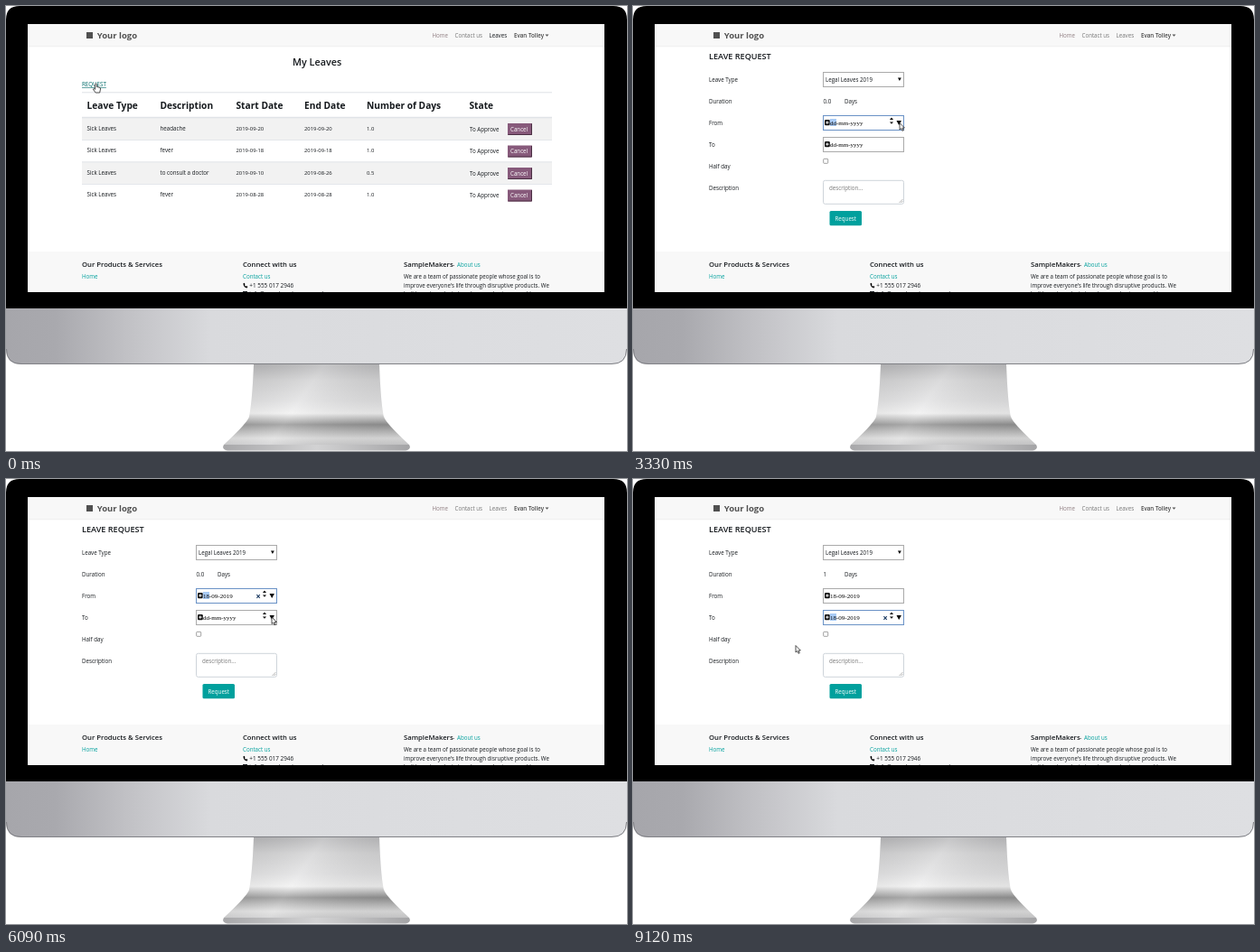
An HTML page that plays this animation: 687x493 px, repeating every 9150 ms.

```html
<!DOCTYPE html>
<html lang="en">
<head>
<meta charset="utf-8">
<title>Leave request</title>
<style>
  html, body { margin: 0; width: 100%; height: 100%; overflow: hidden; background: #fff; }
  svg { display: block; width: 687px; height: 493px; }
  text { font: 500 6.2px "Open Sans", "Noto Sans", sans-serif; fill: #15191d; white-space: pre; }
  text.th { font-size: 10.2px; font-weight: 700; }
  text.title { font-size: 10.8px; font-weight: 600; }
  text.caps { font-size: 9.1px; font-weight: 600; }
  text.logo { font-size: 9.5px; font-weight: 700; fill: #505050; }
  text.foot { font-size: 7.7px; font-weight: 600; }
  text.num { font-size: 5.9px; }
  text.phone { font-size: 6.4px; }
  text.user { font-weight: 600; fill: #444; }
  text.grey { fill: #777; }
  text.rose { fill: #8f7d80; }
  text.teal { fill: #00a09d; }
  text.link { fill: #006b69; text-decoration: underline; }
  text.white { fill: #fff; }
  text.date { font: 7px "Liberation Serif", "Times New Roman", serif; fill: #000; }
</style>
</head>
<body>
<svg viewBox="0 0 687 493">
  <defs>
    <clipPath id="screen"><rect x="24" y="20" width="638" height="297"/></clipPath>
    <linearGradient id="chin">
      <stop offset="0" stop-color="#a6a6ab"/>
      <stop offset=".08" stop-color="#a9a9ae"/>
      <stop offset=".2" stop-color="#c2c2c6"/>
      <stop offset=".33" stop-color="#d9dadd"/>
      <stop offset="1" stop-color="#dedfe2"/>
    </linearGradient>
    <linearGradient id="neck" x2="0" y2="1">
      <stop offset="0" stop-color="#b0b0b2"/>
      <stop offset=".2" stop-color="#cfcfd0"/>
      <stop offset=".45" stop-color="#dededf"/>
      <stop offset=".61" stop-color="#efefef"/>
      <stop offset=".68" stop-color="#bdbdbd"/>
      <stop offset=".75" stop-color="#8c8c8c"/>
      <stop offset=".84" stop-color="#b8b8b8"/>
      <stop offset=".92" stop-color="#dcdcdc"/>
      <stop offset="1" stop-color="#cbcbcc"/>
    </linearGradient>
    <linearGradient id="sheen" x2="1" y2=".3">
      <stop offset="0" stop-color="#777" stop-opacity=".12"/>
      <stop offset=".5" stop-color="#fff" stop-opacity=".25"/>
      <stop offset="1" stop-color="#777" stop-opacity=".1"/>
    </linearGradient>
    <linearGradient id="base">
      <stop offset="0" stop-color="#a8a8aa"/>
      <stop offset=".5" stop-color="#d2d2d3"/>
      <stop offset="1" stop-color="#a4a4a6"/>
    </linearGradient>
    <path id="foot" d="M274 397H413C414 425 416 446 418 455Q420 462 446 486H241Q267 462 269 455C271 446 273 425 274 397Z"/>
  </defs>

  <use href="#foot" fill="url(#neck)"/>
  <use href="#foot" fill="url(#sheen)"/>
  <path d="M241 486H446Q449 491 442 492.5H245Q238 491 241 486Z" fill="url(#base)"/>
  <path d="M0 335H687V380Q687 397 670 397H17Q0 397 0 380Z" fill="url(#chin)"/>
  <path d="M.5 380Q.5 396.5 17 396.5H670Q686.5 396.5 686.5 380" fill="none" stroke="#808186"/>
  <path d="M0 335V15Q0 0 15 0H672Q687 0 687 15V335Z"/>

  <g clip-path="url(#screen)">
    <rect x="24" y="20" width="638" height="297" fill="#fff"/>
    <g id="frame"></g>
    <g id="list"></g>
    <g id="form"></g>
    <g id="cursor">
      <path id="arrow" d="M0 0V7.5L1.8 6L3 8.8L4.3 8.2L3.1 5.5H5.4Z" fill="#fff" stroke="#222" stroke-width=".8"/>
      <path id="hand" d="M-.9 .6Q0-.5 .9 .6V3.5L4.4 4.4Q5.2 4.8 5 6L4.2 10H-.4L-3.2 6.2Q-2.8 5-.9 6.3Z" fill="#fff" stroke="#222" stroke-width=".8"/>
      <path id="beam" d="M-1.7-3.5H-.4L0-3.1L.4-3.5H1.7M0-3.1V3.1M-1.7 3.5H-.4L0 3.1L.4 3.5H1.7" fill="none" stroke="#222" stroke-width=".9"/>
    </g>
  </g>
</svg>
<script>
const LOOP = 9150;
const OPEN = 1410, FROM_FOCUS = 3000, FROM_SET = 4560, TO_FOCUS = 6240, TO_SET = 7530, COUNTED = 7950;

const $ = id => document.getElementById(id);
const text = (x, y, str, cls = "") => `<text x="${x}" y="${y}" class="${cls}">${str}</text>`;
const rect = (x, y, w, h, fill, extra = "") =>
  `<rect x="${x}" y="${y}" width="${w}" height="${h}" fill="${fill}" ${extra}/>`;
const path = (d, extra = "") => `<path d="${d}" ${extra}/>`;
const line = (y, color) => rect(84, y, 520, 1, color);

// Header and footer shared by both pages
$("frame").innerHTML =
  rect(24, 20, 638, 25, "#f8f8f8") + rect(24, 44.5, 638, .7, "#ececec") +
  rect(89, 29, 7, 7, "#505050") + text(100.7, 36, "Your logo", "logo") +
  text(471.5, 35, "Home", "rose") + text(496.5, 35, "Contact us", "grey") +
  `<text id="leaves" x="534.5" y="35">Leaves</text>` +
  text(562, 35, "Evan Tolley", "user") +
  path("M596.5 31.5h4l-2 2.2z", 'fill="#555"') +
  rect(24, 272, 638, 45, "#f8f8f8") +
  text(84, 289, "Our Products &amp; Services", "foot") + text(84, 301.7, "Home", "teal") +
  text(262, 289, "Connect with us", "foot") + text(262, 301.7, "Contact us", "teal") +
  path("M262.4 307.6l1.2-.9 1 1.6-.7.8q.5 1.2 1.4 1.7l.7-.8 1.4 1-.8 1.4q-3.6-.3-4.2-4.8z") +
  text(269.3, 311.5, "+1 555 017 2946", "phone") +
  rect(262, 316, 5, 4, "#212529") + text(269.3, 321.2, "info@samplemakers.example.com") +
  text(440, 289, "SampleMakers", "foot") + text(494.3, 289, "-") + text(499, 289, "About us", "teal") +
  text(440, 301.7, "We are a team of passionate people whose goal is to") +
  text(440, 311.5, "improve everyone's life through disruptive products. We") +
  text(440, 321.2, "build great products to solve your business problems.");

const leaves = [
  ["headache", "2019-09-20", "2019-09-20", "1.0"],
  ["fever", "2019-09-18", "2019-09-18", "1.0"],
  ["to consult a doctor", "2019-09-10", "2019-08-26", "0.5"],
  ["fever", "2019-08-28", "2019-08-28", "1.0"]
];
const cols = [170.5, 254.5, 330, 399];

function leaveRow(row, i) {
  const y = 123.5 + i * 24.5;
  return (i % 2 ? "" : rect(84, y, 520, 24.5, "#f2f2f2")) +
    rect(84, y, 520, .8, "#dee2e6") +
    text(89.5, y + 14, "Sick Leaves") +
    row.map((s, k) => text(cols[k], y + 14, s, k ? "num" : "")).join("") +
    text(513, y + 15.3, "To Approve") +
    rect(555, y + 6.5, 27, 13, "#875a7b") +
    path(`M555.5 ${y + 19}h26v-12`, 'fill="none" stroke="#4a2f43"') +
    text(558, y + 15.3, "Cancel", "white");
}

$("list").innerHTML =
  text(317, 66, "My Leaves", "title") + text(84, 89.4, "REQUEST", "link") + line(95.3, "#dee2e6") +
  ["Leave Type", "Description", "Start Date", "End Date", "Number of Days", "State"]
    .map((s, i) => text([89.5, ...cols, 512.5][i], 114, s, "th")).join("") +
  leaves.map(leaveRow).join("") + line(122.8, "#dee2e6");

function dateField(id, y) {
  return `<g id="${id}" transform="translate(0 ${y})">` +
    rect(210.5, .5, 89, 16, "#fff", 'class="box" stroke="#aaa"') +
    rect(212, 5, 5.8, 6.2, "#111", 'rx="1.2"') +
    path("M213.2 8.1h3.4M214.9 6.4v3.4", 'stroke="#fff"') +
    rect(217.8, 4, 7.2, 8, "#a9cbf5", 'class="mark"') +
    `<text class="date" x="218" y="10.7"></text>` +
    `<g class="tools">${path("M284 5l2-2.4 2 2.4zM284 7.4l2 2.4 2-2.4z")}` +
    `${path("M291.5 6h5.4l-2.7 5z")}</g>` +
    path("M277.4 7.2l3.4 3.6m0-3.6l-3.4 3.6", 'class="clear" stroke="#1d3c63" stroke-width="1.1"') + "</g>";
}

$("form").innerHTML =
  text(84, 59, "LEAVE REQUEST", "caps") +
  ["Leave Type", "Duration", "From", "To", "Half day", "Description"]
    .map((s, i) => text(84, 83.8 + i * 24, s)).join("") +
  rect(210.5, 73.5, 89, 16, "#fff", 'stroke="#aaa"') + text(213, 84, "Legal Leaves 2019") +
  path("M293 79.5h3.8l-1.9 3.6z") +
  `<text id="days" x="210.5" y="107.8"></text>` + text(234, 107.8, "Days") +
  dateField("from", 121) + dateField("to", 145) +
  rect(210.7, 169.3, 5, 5, "#fff", 'rx=".8" stroke="#888" stroke-width=".8"') +
  rect(210.5, 193.3, 89, 26, "#fff", 'rx="2" stroke="#ced4da"') +
  text(217, 204, "description...", "grey") +
  path("M294.5 218l4-4m-2 4l2-2", 'stroke="#888" stroke-width=".6"') +
  rect(217.5, 227, 35.5, 16.3, "#00a09d", 'rx="1.6"') + text(223.5, 237.7, "Request", "white");

const show = (el, on) => el.setAttribute("visibility", on ? "inherit" : "hidden");

function setDate(id, filled, focused, hovered) {
  const part = cls => $(id).querySelector("." + cls);
  part("date").textContent = filled ? "18-09-2019" : "dd-mm-yyyy";
  part("box").setAttribute("stroke", focused ? "#6a92c6" : "#aaa");
  show(part("mark"), focused);
  show(part("tools"), focused || hovered);
  show(part("clear"), filled && (focused || hovered));
}

// Pointer stops: time, x, y
const stops = [
  [0, 99.5, 86], [1500, 99.5, 86], [2130, 264, 131], [2300, 264, 131], [2820, 295, 129.5],
  [3540, 295, 129.5], [4290, 262, 205], [5190, 262, 205], [5940, 294, 153],
  [6480, 294, 153], [7110, 256.5, 223], [7860, 256.5, 223], [8760, 180, 184.5], [LOOP, 180, 184.5]
];

function pointer(t) {
  const i = stops.findIndex(s => s[0] > t);
  const [t0, x0, y0] = stops[i - 1], [t1, x1, y1] = stops[i];
  const p = (t - t0) / (t1 - t0), e = p * p * (3 - 2 * p);
  return [x0 + (x1 - x0) * e, y0 + (y1 - y0) * e];
}

const inside = (x, y, top, bottom) => x > 210 && x < 300 && y > top && y < bottom;

function draw(now) {
  const t = now % LOOP, [x, y] = pointer(t), onForm = t >= OPEN;
  show($("list"), !onForm);
  show($("form"), onForm);
  $("leaves").setAttribute("class", onForm ? "grey" : "");
  $("days").textContent = t >= COUNTED ? "1" : "0.0";

  const picking = t >= FROM_FOCUS && t < FROM_SET || t >= TO_FOCUS && t < TO_SET;
  setDate("from", t >= FROM_SET, t >= FROM_FOCUS && t < TO_FOCUS, !picking && inside(x, y, 121, 137));
  setDate("to", t >= TO_SET, t >= TO_FOCUS, !picking && inside(x, y, 145, 161));

  const beam = onForm && !picking && inside(x, y, 193, 220);
  show($("hand"), !onForm);
  show($("beam"), beam);
  show($("arrow"), onForm && !beam);
  $("cursor").setAttribute("transform", `translate(${x} ${y})`);
  requestAnimationFrame(draw);
}
requestAnimationFrame(draw);
</script>
</body>
</html>
```
